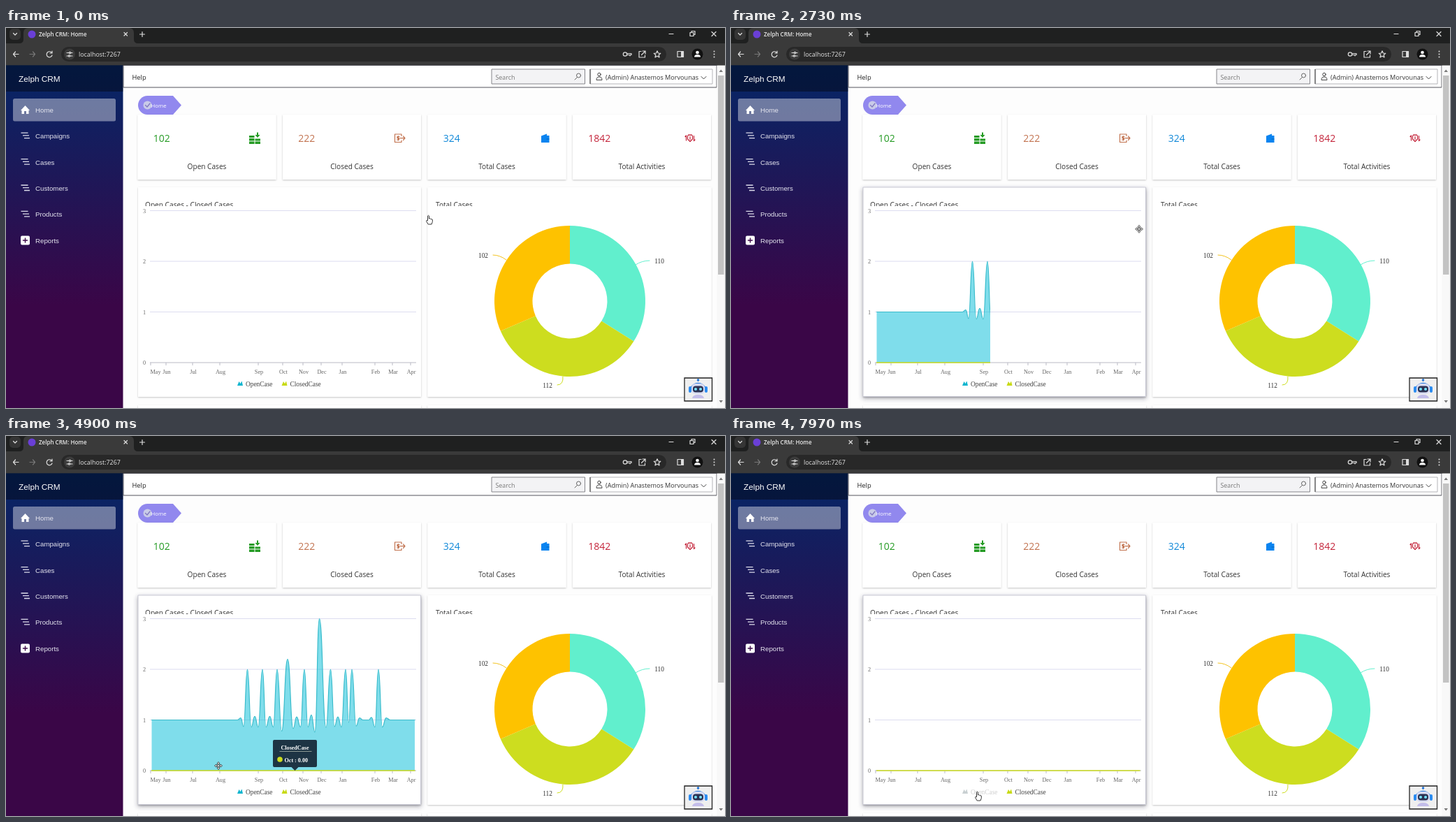
Write an HTML page that moves like this. It is 1029x544 px and loops after 8000 ms.

```html
<!DOCTYPE html>
<html lang="en">
<head>
<meta charset="utf-8">
<title>Zelph CRM: Home</title>
<style>
html, body { margin: 0; width: 100%; height: 100%; overflow: hidden; background: #fdfdfd; }
svg { display: block; width: 100vw; height: 100vh; }
text { font-family: "Open Sans", "Noto Sans", sans-serif; fill: #333; }
.nav text { font: 9.7px "Liberation Sans", Arial, sans-serif; fill: #e4e4ee; }
.chart text { font-family: "Liberation Serif", "Times New Roman", serif; fill: #666; }
.chart .axis text { font-size: 8.2px; }
.chart .legend text { font-size: 9.4px; fill: #444; }
.chart .tip text { font-size: 8.1px; font-weight: bold; fill: #fff; }
.mid text, .mid { text-anchor: middle; }
.line { fill: none; stroke-linecap: round; stroke-linejoin: round; }

.anim { animation: 8s linear infinite; }
.cut { animation: 8s step-end infinite; }
.cursor { animation-name: travel; }
.hand { animation-name: hand; }
.move { animation-name: move; }
.hover { animation-name: hover; }
.reveal { animation-name: reveal; }
.open { animation-name: open; }
.off { animation-name: off; }
.tip { animation-name: tip; }
.slide { animation-name: slide; }
.oct { animation-name: oct; }
.aug { animation-name: aug; }

@keyframes travel {
  0%, 31.6% { transform: translate(606px, 274px); animation-timing-function: ease-in-out; }
  43.1%, 49% { transform: translate(386px, 411px); animation-timing-function: ease-in-out; }
  56%, 58% { transform: translate(413px, 470px); animation-timing-function: ease-in-out; }
  61.2%, 70% { transform: translate(304px, 472px); animation-timing-function: ease-in-out; }
  72.6%, 75% { transform: translate(354px, 493px); }
  78%, 100% { transform: translate(354px, 515px); }
}
@keyframes hand { 0% { opacity: 1 } 33% { opacity: 0 } 77% { opacity: 1 } }
@keyframes move { 0% { opacity: 0 } 33% { opacity: 1 } 77%, 100% { opacity: 0 } }
@keyframes hover { 0% { opacity: 0 } 33% { opacity: 1 } 100% { opacity: 1 } }
@keyframes reveal { 0%, 28.75% { clip-path: inset(0 100% 0 0) } 41.25%, 100% { clip-path: inset(0 0 0 0) } }
@keyframes open { 0% { opacity: 1 } 90.6%, 100% { opacity: 0 } }
@keyframes off { 0% { opacity: 0 } 90.6%, 100% { opacity: 1 } }
@keyframes tip { 0% { opacity: 0 } 55% { opacity: 1 } 90.6%, 100% { opacity: 0 } }
@keyframes slide {
  0%, 61.9% { transform: translateX(413.5px) }
  65.6%, 71.7% { transform: translateX(304px) }
  74.75%, 100% { transform: translateX(353.5px) }
}
@keyframes oct { 0% { opacity: 1 } 61.9%, 100% { opacity: 0 } }
@keyframes aug { 0% { opacity: 0 } 61.9%, 100% { opacity: 1 } }
</style>
</head>
<body>
<svg viewBox="0 0 1029 544" preserveAspectRatio="none">
  <defs>
    <linearGradient id="side" x2="0" y2="1">
      <stop stop-color="#052767"/><stop offset=".7" stop-color="#3a0647"/>
    </linearGradient>
    <filter id="soft" x="-10%" y="-10%" width="120%" height="125%">
      <feDropShadow dx="0" dy="1" stdDeviation="1" flood-color="#000" flood-opacity=".22"/>
    </filter>
    <filter id="lift" x="-10%" y="-10%" width="120%" height="125%">
      <feDropShadow dx="0" dy="2.5" stdDeviation="3" flood-color="#334" flood-opacity=".4"/>
    </filter>
    <clipPath id="titles"><path d="M189 228H1010V254.5H189z"/></clipPath>
  </defs>
  <path fill="#fdfdfd" d="M0 0H1029V544H0z"/>

  <!-- browser frame -->
  <path fill="#1f2020" d="M0 0H1029V54H0z"/>
  <path fill="#3a3a3a" d="M0 22H19Q25 22 25 16V7Q25 0 32 0H176Q183 0 183 7V16Q183 22 189 22H1029V53.5H0z"/>
  <rect x="5" y="1" width="16" height="16" rx="5" fill="#353535"/>
  <rect x="79" y="27" width="866" height="21" rx="10.5" fill="#282828"/>
  <circle cx="91" cy="37.500" r="8" fill="#3c3c3c"/>
  <circle cx="37" cy="9" r="5.500" fill="#6a3fd6"/>
  <text x="47" y="12" font-size="8" font-weight="600" style="fill:#e8e8e8">Zelph CRM: Home</text>
  <text x="104" y="41" font-size="8.900" style="fill:#e4e4e4">localhost:7267</text>
  <g class="line" stroke="#dedede" stroke-width="1.200">
    <path d="M10.500 7.500L13 10L15.500 7.500M169 6.500L173.500 11M173.500 6.500L169 11M191.500 9H198.500M195 5.500V12.500"/>
    <path d="M949 8.500H955M979 6.500H984V11.500H979zM981 6V4.500H986V9.500H984.500M1010 5.500L1016 11.500M1016 5.500L1010 11.500"/>
    <path d="M18 37.500H10.500M13.500 34L10.500 37.500L13.500 41M65.500 35.500A4 4 0 1 0 66 39M66 33V36H63"/>
    <path stroke="#777" d="M34 37.500H41.500M38.500 34L41.500 37.500L38.500 41"/>
    <path d="M87 35.500H90M93 35.500H95M87 40H89M92 40H95"/>
    <circle cx="91.500" cy="35.500" r="1.200"/><circle cx="90.500" cy="40" r="1.200"/>
    <circle cx="886" cy="37.500" r="2.700"/><path d="M889 36.500H895V38.500H889M893 39V40"/>
    <path d="M909 33.500H906V42H914.500V39M911 33H915V37M915 33L909.500 38.500"/>
    <path d="M932 32.800L933.400 36L936.800 36.300L934.200 38.500L935 42L932 40.200L929 42L929.800 38.500L927.200 36.300L930.600 36z"/>
    <path d="M961 33.500H969.500V41.500H961z"/>
  </g>
  <path fill="#dedede" d="M966 33.500H969.500V41.500H966z"/>
  <circle cx="989.500" cy="37.500" r="8" fill="#111"/>
  <circle cx="989.500" cy="35" r="2.300" fill="#fff"/><path fill="#fff" d="M985 41.500Q985 38 989.500 38T994 41.500z"/>
  <g fill="#dedede"><circle cx="1013.500" cy="33.500" r="1"/><circle cx="1013.500" cy="37.500" r="1"/><circle cx="1013.500" cy="41.500" r="1"/></g>

  <!-- sidebar -->
  <path fill="url(#side)" d="M0 53.500H167.500V544H0z"/>
  <path fill="#000" fill-opacity=".4" d="M0 53.500H167.500V91H0z"/>
  <rect x="10" y="101" width="147" height="32.500" rx="2.500" fill="#fff" fill-opacity=".4"/>
  <g class="nav" id="nav"><text x="18" y="76.500" style="font-size:11.8px;fill:#fff">Zelph CRM</text></g>
  <path fill="#fff" d="M21 118L27.500 111L34 118H32.500V123H29V119H26V123H22.500V118z"/>
  <rect x="21" y="297.500" width="13" height="13" rx="2" fill="#fff"/>
  <path class="line" stroke="#3a0647" stroke-width="1.400" d="M24.500 304H30.500M27.500 301V307"/>

  <!-- page header -->
  <path fill="#fff" stroke="#55555c" d="M168 53.500H1017V85H168z"/>
  <text x="180.500" y="73.500" font-size="9.300" style="fill:#222">Help</text>
  <path fill="#f3f3f5" stroke="#85858a" d="M695 59H828.500V80H695z"/>
  <text x="700.500" y="73.500" font-size="8.900" style="fill:#777">Search</text>
  <g class="line" stroke="#666"><circle cx="819.500" cy="68" r="3"/><path d="M817.500 70.500L814 74"/></g>
  <path fill="#fff" stroke="#b4b4b8" d="M836 59H1011V80H836z"/><path stroke="#333" d="M836 59V80"/>
  <g class="line" stroke="#444"><circle cx="849" cy="66.500" r="2.200"/><path d="M845 74Q845 70 849 70T853 74zM995 69.500L998.500 73L1002 69.500"/></g>
  <text x="858" y="73.500" font-size="9.100" style="fill:#333">(Admin) Anastemos Morvounas</text>

  <!-- scrollbar -->
  <path fill="#f8f8f8" d="M1017.500 53.500H1029V544H1017.500z"/>
  <path fill="#c3c3c3" d="M1019 68H1027.500V353H1019z"/>
  <path fill="#777" d="M1020.500 63H1026L1023.200 59.500zM1020.500 533H1026L1023.200 536.500z"/>

  <!-- breadcrumb -->
  <path fill="#9188ee" d="M202.500 97H239L251 110.500L239 124H202.500A13.500 13.500 0 0 1 202.500 97z"/>
  <circle cx="202.500" cy="110.500" r="6" fill="#c9cbe8"/>
  <path class="line" stroke="#8078c0" stroke-width="1.300" d="M199.500 110.500L202 113L206 108"/>
  <text x="207.500" y="113.500" font-size="7.800" style="fill:#fff">Home</text>

  <!-- cards -->
  <g id="cards" fill="#fff"></g>
  <g fill="#259b24">
    <path d="M348 154H355.500V157H348zM348 158H355.500V161.500H348zM348 162.500H355.500V166H348zM356.500 158.500H364V161.500H356.500zM356.500 162.500H364V166H356.500zM359 149.500H361V153H363.500L360 157L356.500 153H359z"/>
  </g>
  <g class="line" stroke="#c27350" stroke-width="1.200">
    <path d="M566 154.500V152H556.500V163.500H566V161M564 157.700H571M568.500 155L571 157.700L568.500 160.500M563 155.500H560V157.700H562.500V160H559.500M561.300 154.500V161"/>
  </g>
  <path fill="#0a84f0" d="M766 154.500L774 151.500V154H777.500V164H766z"/><path stroke="#0667c0" d="M773.500 159H777.500"/>
  <g class="line" stroke="#c4253b" stroke-width="1.200">
    <path d="M979 162.500L975.500 159V155Q977 151.500 979 153.500Q981 151.500 982.500 155V159zM979 155.500V159.500M973.500 154.500V161M984.500 154.500V161M972 155.500L973.500 154M986 160L984.500 161.500"/>
  </g>
  <g filter="url(#soft)" fill="#fff">
    <path d="M189 228H594V528H189zM603.500 228H1009.500V528H603.500zM189 540H594V560H189zM603.500 540H1009.500V560H603.500z"/>
  </g>
  <path class="cut hover" filter="url(#lift)" fill="#fff" stroke="#c9c9d4" d="M189 228H593.500V527.500H189z"/>
  <g clip-path="url(#titles)" font-size="10.150"><text x="199" y="256.800">Open Cases - Closed Cases</text><text x="615" y="256.800">Total Cases</text></g>

  <g class="chart">
    <g id="axis" class="axis mid"></g>
    <g class="cut open"><g class="anim reveal">
      <path id="area" fill="#00bcd7" fill-opacity=".5"/>
      <path id="edge" class="line" stroke="#3abccb" stroke-width="1.200"/>
    </g></g>
    <g class="anim reveal"><path fill="#cddc1f" d="M208 478.300H585.500V479.700H208z"/></g>
    <g class="legend">
      <g class="cut open"><path fill="#10b5cf" d="M331 512L333.500 506L335.500 509L337.500 505.500L339 512z"/><text x="343" y="512.500">OpenCase</text></g>
      <g class="cut off"><path fill="#c9d0d2" d="M331 512L333.500 506L335.500 509L337.500 505.500L339 512z"/><text x="343" y="512.500" style="fill:#cfcfcf">OpenCase</text></g>
      <path fill="#c8da16" d="M394.500 512L397 506L399 509L401 505.500L402.500 512z"/><text x="406.500" y="512.500">ClosedCase</text>
    </g>
    <g id="donut"></g>
    <g class="mid" font-size="9.400"><text x="935" y="336.500" style="fill:#333">110</text><text x="683" y="328.500" style="fill:#333">102</text><text x="775" y="514.800" style="fill:#333">112</text></g>
    <g class="line">
      <path stroke="#61efcd" d="M901 339Q910 333 921 333"/><path stroke="#f2c11c" d="M716 332Q707 325 697 325"/><path stroke="#cddd1f" d="M797 499Q798 511 789 511"/>
    </g>
    <g class="cut tip"><g class="anim slide">
      <path fill="#1d3444" d="M-29.500 435H29.500Q31.500 435 31.500 437V472Q31.500 474 29.500 474H5L0 479L-5 474H-29.500Q-31.500 474 -31.500 472V437Q-31.500 435 -29.500 435z"/>
      <text class="mid" y="448.500">ClosedCase</text>
      <path stroke="#a9b3a8" stroke-width=".8" d="M-22 451.500H24"/>
      <circle cx="-21.500" cy="463" r="3.800" fill="#cddc1f"/>
      <text class="cut oct" x="-15" y="466.500">Oct : 0.00</text>
      <text class="cut aug" x="-15" y="466.500">Aug : 0.00</text>
    </g></g>
  </g>

  <!-- assistant button -->
  <path fill="#efefef" stroke="#222" stroke-width="1.300" d="M971 501H1010.500V534H971z"/>
  <path class="line" stroke="#2b7de0" stroke-width="1.600" d="M980 516A11 10.500 0 0 1 1001 516"/>
  <path stroke="#555" d="M990.500 506V502"/><circle cx="990.500" cy="504" r="1.800" fill="#2b7de0"/>
  <rect x="981" y="509" width="19" height="15" rx="6" fill="#d9dcf2"/>
  <rect x="983" y="512.500" width="15" height="9" rx="4" fill="#2c3152"/>
  <circle cx="987" cy="517" r="2" fill="#74e3ff"/><circle cx="994" cy="517" r="2" fill="#74e3ff"/>
  <rect x="977" y="513" width="4" height="9" rx="2" fill="#2b8cf0"/><rect x="1000" y="513" width="4" height="9" rx="2" fill="#2b8cf0"/>
  <path fill="#c3bdea" d="M982 530Q983 525 990.500 525T999 530z"/>

  <!-- pointer -->
  <g class="anim cursor">
    <path class="cut hand" fill="#fff" stroke="#222" stroke-width=".9" stroke-linejoin="round" d="M-2.500 1.500V-5Q-1.500 -6.500 -.5 -5V-1Q.5 -2 1.300 -.7Q2.200 -1.500 2.900 -.2Q4.300 -.8 4.300 1V3.500L3 7H-1.800L-4.500 2.500Q-4.500 .5 -2.500 2z"/>
    <g class="cut move">
      <path fill="#fff" stroke="#333" stroke-width=".9" d="M0 -5.500L2 -3H.8V-.8H3V-2L5.500 0L3 2V.8H.8V3H2L0 5.500L-2 3H-.8V.8H-3V2L-5.500 0L-3 -2V-.8H-.8V-3H-2z"/>
    </g>
  </g>
</svg>
<script>
const byId = id => document.getElementById(id);
const add = (id, markup) => byId(id).insertAdjacentHTML('beforeend', markup);

['Home', 'Campaigns', 'Cases', 'Customers', 'Products', 'Reports'].forEach((name, i) => {
  const y = 117.3 + i * 37.4;
  add('nav', `<text x="42" y="${y + 3.5}">${name}</text>`);
  if (i > 0 && i < 5)
    add('nav', `<path stroke="#dcdcea" stroke-width="1.3" d="M21.500 ${y - 4.5}h10M24 ${y - .8}h9M26 ${y + 3}h8"/>`);
});

[['102', 'Open Cases', '#259b24'], ['222', 'Closed Cases', '#c27350'],
 ['324', 'Total Cases', '#1088d8'], ['1842', 'Total Activities', '#c4253b']].forEach(([count, label, color], i) => {
  const x = 188.500 + i * 207.5;
  add('cards', `<path filter="url(#soft)" d="M${x} 124h198v93h-198z"/>
    <text x="${x + 22.300}" y="163" font-size="14" style="fill:${color}">${count}</text>
    <text class="mid" x="${x + 99}" y="201.500" font-size="10.100">${label}</text>`);
});

const BASE = 479, UNIT = 72.5;
const level = v => BASE - v * UNIT;

for (let v = 0; v <= 3; v++)
  add('axis', `<path stroke="${v ? '#dcdcf0' : '#b9b9c4'}" d="M206 ${level(v)}H587"/><text x="198" y="${level(v) + 3}">${v}</text>`);
const months = { May: 214, Jun: 230, Jul: 268, Aug: 307, Sep: 362, Oct: 397, Nov: 426, Dec: 452, Jan: 482, Feb: 529, Mar: 554, Apr: 580 };
for (const [name, x] of Object.entries(months))
  add('axis', `<path stroke="#b9b9c4" d="M${name === 'May' ? 207 : x - 1} 479v4"/><text x="${x}" y="494.500">${name}</text>`);

// Turning points of the curve: x and value.
const turns = [[208.5, 1], [331, 1], [336, 1.04], [340, .87], [345.5, 2], [351, .86], [356, 1.07], [361, .86],
  [367, 2], [372, .86], [377.5, 1.07], [382.5, .86], [388, 2], [394.5, .78], [403, 2.2], [411, .83], [416, 1.06],
  [421.5, .86], [427, 2], [432, .86], [437, 1.1], [442, .76], [448.500, 3], [458, .85], [464.500, 2], [470, .87],
  [475, 1.06], [480, .86], [486, 2], [490.500, .95], [495, 2], [501, .88], [506, 1.04], [511, 1], [519, 1],
  [523, 1.05], [528, .86], [533, 2], [538.500, .86], [544, 1.04], [550, 1], [585, 1]];
const curve = turns.map(([x, v], i) => {
  if (!i) return `M${x} ${level(v)}`;
  const [px, pv] = turns[i - 1], mid = (px + x) / 2;
  return `C${mid} ${level(pv)} ${mid} ${level(v)} ${x} ${level(v)}`;
}).join('');
byId('edge').setAttribute('d', curve);
byId('area').setAttribute('d', `${curve}V${BASE}H208.5z`);

const polar = (r, turn) => `${807 + r * Math.sin(turn * 2 * Math.PI)} ${391 - r * Math.cos(turn * 2 * Math.PI)}`;
let from = 0;
for (const [count, color] of [[110, '#61efcd'], [112, '#cddd1f'], [102, '#fec200']]) {
  const to = from + count / 324;
  add('donut', `<path fill="${color}" d="M${polar(108, from)}A108 108 0 0 1 ${polar(108, to)}L${polar(53.5, to)}A53.5 53.5 0 0 0 ${polar(53.5, from)}z"/>`);
  from = to;
}
</script>
</body>
</html>
```
